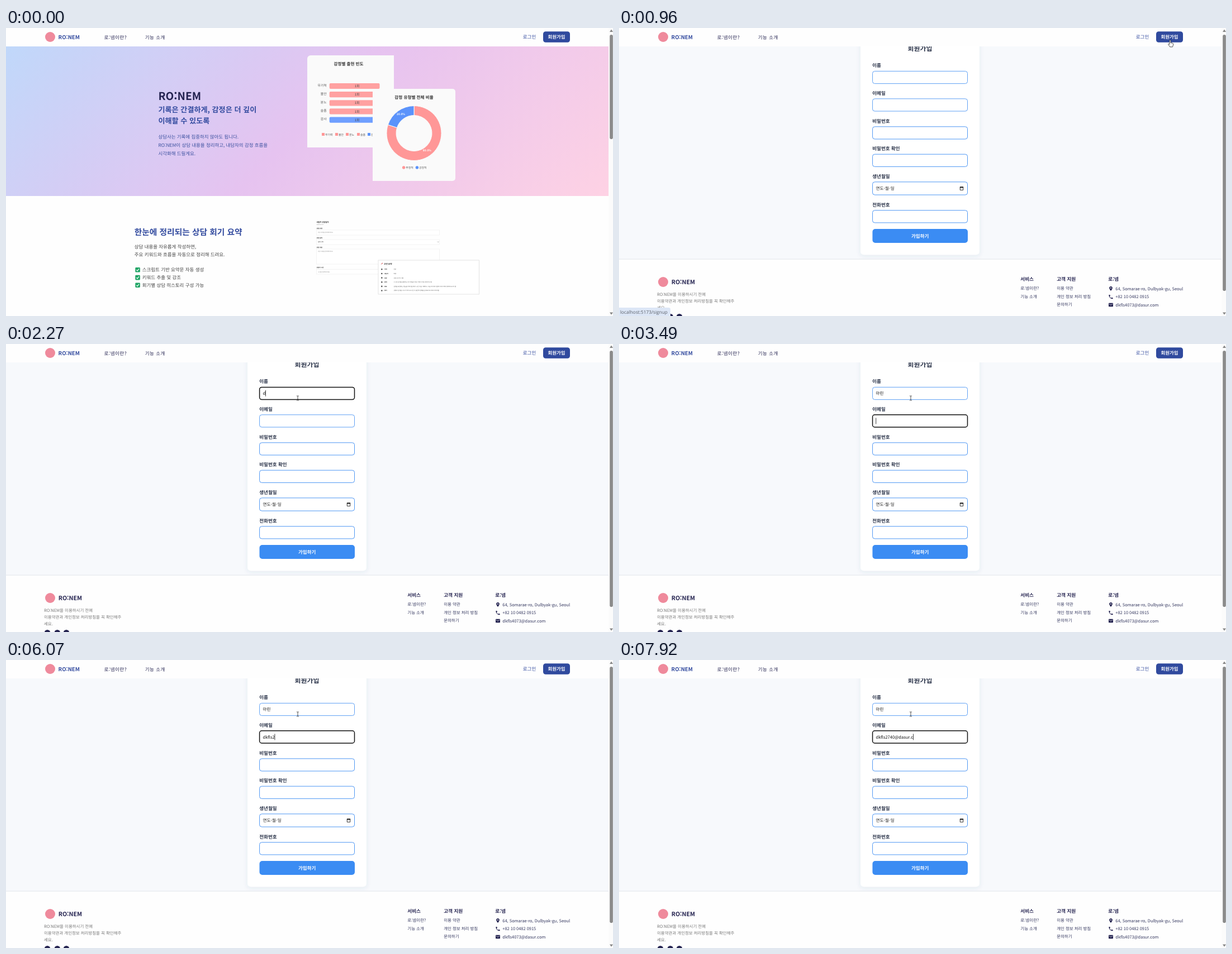
An HTML page that plays this animation: 1086 px wide and 516 px high, repeating every 8000 ms.

```html
<!DOCTYPE html>
<html lang="ko">
<head>
<meta charset="utf-8">
<title>RO:NEM</title>
<style>
  html, body { margin: 0; width: 100%; height: 100%; overflow: hidden; background: #fefefe; }
  svg { display: block; width: 1086px; height: 516px; }
  text {
    font-family: "Noto Sans CJK KR", "Noto Sans CJK JP", "Noto Sans CJK", "Noto Sans KR", sans-serif;
    font-variant-ligatures: no-contextual;
    text-rendering: geometricPrecision;
  }
  .status { font-family: "Open Sans", "Noto Sans", sans-serif; }
</style>
</head>
<body>
<svg id="stage" viewBox="0 0 1086 516" xmlns="http://www.w3.org/2000/svg"></svg>
<script>
const LOOP = 8000;
const NAVY = '#242350', BLUE = '#334b9f', PINK = '#ff9797', SKY = '#5b93fb', LOGO = '#ef8a9c';

// Text placed by its vertical centre.
const text = (x, cy, str, size, fill, weight = 400, more = '') =>
  `<text x="${x}" y="${cy + size * 0.37}" font-size="${size}" fill="${fill}" font-weight="${weight}" ${more}>${str}</text>`;
const mid = 'text-anchor="middle"', end = 'text-anchor="end"';
const rect = (x, y, w, h, fill, more = '') =>
  `<rect x="${x}" y="${y}" width="${w}" height="${h}" fill="${fill}" ${more}/>`;
const dot = (x, y, r, fill) => `<circle cx="${x}" cy="${y}" r="${r}" fill="${fill}"/>`;
const path = (d, fill, more = '') => `<path d="${d}" fill="${fill}" ${more}/>`;
const group = (id, body) => `<g id="${id}">${body}</g>`;

function barCard() {
  const names = ['무기력', '불안', '분노', '슬픔', '감사'];
  const legendX = [565, 589, 608, 628, 647];
  const color = i => i < 4 ? PINK : SKY;
  return path('M545 49H694V214H539V55a6 6 0 0 1 6-6z', '#fafafa') +
    text(613, 64.5, '감정별 출현 빈도', 7.55, '#333', 700, mid) +
    names.map((name, i) => {
      const y = 104 + i * 15.15;
      return text(573.5, y - 1.5, name, 5.8, '#555', 400, end) +
        rect(578.7, y - 5.1, 89.8, 10.2, i < 4 ? '#ffa1a1' : '#6f9fff', 'rx="2"') +
        text(628, y, '1회', 5.8, '#444', 500, mid) +
        rect(legendX[i], 188, 5, 5, color(i)) +
        text(legendX[i] + 6, 190.7, name, 4.9, '#555');
    }).join('');
}

function donutCard() {
  const cx = 730, cy = 188.5, R = 49, r = 32;
  const at = (deg, rad) => {
    const a = (deg - 90) * Math.PI / 180;
    return `${(cx + rad * Math.cos(a)).toFixed(2)} ${(cy + rad * Math.sin(a)).toFixed(2)}`;
  };
  const slice = (a, b, fill) => {
    const big = b - a > 180 ? 1 : 0;
    return path(`M${at(a, R)}A${R} ${R} 0 ${big} 1 ${at(b, R)}L${at(b, r)}A${r} ${r} 0 ${big} 0 ${at(a, r)}z`,
      fill, 'stroke="#fafafa" stroke-width="1"');
  };
  return path('M656 109H799a5 5 0 0 1 5 5V269a5 5 0 0 1-5 5H656z', '#fafafa') +
    text(730, 124.3, '감정 유형별 전체 비율', 7.6, '#333', 700, mid) +
    slice(0, 288, PINK) + slice(288, 360, SKY) +
    text(706.5, 154.2, '20.0%', 4.9, '#fff', 700, mid) +
    text(753.3, 219.4, '80.0%', 4.9, '#fff', 700, mid) +
    dot(711.6, 250, 2.7, PINK) + text(715.2, 250.4, '부정적', 4.9, '#555') +
    dot(735.4, 250, 2.7, SKY) + text(739, 250.4, '긍정적', 4.9, '#555');
}

function notes() {
  const line = 'stroke="#ececec" stroke-width=".6"';
  const field = (y, h, label, hint, w = 220, tone = '#888') =>
    text(555.5, y - 3, label, 2.6, '#333', 700) +
    rect(555.5, y, w, h, '#fff', line) +
    text(558, y + 4.5, hint, 2.5, tone);
  const rows = [
    ['주제', '진로'], ['내담자', '학생'], ['상황', '상담 초기의 기록'],
    ['문제', '스스로 감정을 표현하는 데 어려움이 있고 걱정이 많은 편이라고 함'],
    ['목표', '감정을 표현하는 연습을 하며 일상에서 느낀 것을 기록하고, 다음 회기에서 함께 이야기하며 정리해 보고자 함'],
    ['정리', '상황과 감정을 나누어 적어 보고 한 주 동안의 변화를 살펴보기로 하며 마무리함']
  ];
  return text(555.5, 347.3, '내담자 상담일지', 3.3, '#222', 700) +
    text(555.5, 352, '2025-07-07', 2.5, '#888') +
    field(362, 9, '상담 유형', '상담 유형을 입력해주세요') +
    field(379, 9, '상담 날짜', '날짜 선택', 220, '#222') +
    path('M772 382.6l1.2 1.3 1.2-1.3', 'none', 'stroke="#666" stroke-width=".5"') +
    field(396, 27, '상담 내용', '상담 내용을 입력해주세요') +
    field(432.5, 8.5, '상담자 소견', '소견을 입력해주세요', 111) +
    rect(666, 416, 180.5, 61, '#fff', 'stroke="#dcdcdc" stroke-width=".8"') +
    path('M670.5 424.2l2.6-3.6 1.2 1z', '#d95a5a') +
    text(676, 422.2, '고민 요약', 3.7, '#222', 700) +
    rows.map(([label, value], i) => {
      const y = 432.3 + i * 7.65;
      return dot(672.3, y, 1.3, '#555') + text(677, y, label, 2.5, '#333', 700) + text(693.5, y, value, 2.5, '#555');
    }).join('');
}

function home() {
  const check = (y, str) =>
    rect(231.3, y - 4.2, 8.6, 8.6, '#21a566', 'rx="1.4"') +
    path(`M233.3 ${y + .2}l1.7 1.8 3-3.8`, 'none', 'stroke="#fff" stroke-width="1.2"') +
    text(243.8, y, str, 8.45, '#444');
  return rect(0, 0, 1086, 516, '#fefefe') + rect(0, 33, 1078, 268, 'url(#hero)') +
    text(272.5, 121.5, 'RO:NEM', 19.2, NAVY, 700) +
    text(272.5, 146, '기록은 간결하게, 감정은 더 깊이', 13.12, BLUE, 600) +
    text(272.5, 166, '이해할 수 있도록', 13.12, BLUE, 600) +
    text(272.5, 194.6, '상담사는 기록에 집중하지 않아도 됩니다.', 8.43, '#3a509f') +
    text(272.5, 210, 'RO:NEM이 상담 내용을 정리하고, 내담자의 감정 흐름을', 8.43, '#3a509f') +
    text(272.5, 225.3, '시각화해 드릴게요.', 8.43, '#3a509f') +
    barCard() + donutCard() +
    text(229.7, 365.5, '한눈에 정리되는 상담 회기 요약', 14.75, BLUE, 700) +
    text(229.8, 392.2, '상담 내용을 자유롭게 작성하면,', 8.45, '#444') +
    text(229.8, 406, '주요 키워드와 흐름을 자동으로 정리해 드려요.', 8.45, '#444') +
    check(433.2, '스크립트 기반 요약문 자동 생성') +
    check(447, '키워드 추출 및 강조') +
    check(460.6, '회기별 상담 히스토리 구성 가능') +
    notes();
}

function footer() {
  const small = (x, y, str) => text(x, y, str, 7.45, '#33365e');
  const head = (x, str) => text(x, 450.2, str, 8.6, NAVY, 700);
  const icon = (y, d) => path(d, NAVY, `fill-rule="evenodd" transform="translate(875.2 ${y - 4.8}) scale(.4)"`);
  return rect(0, 414, 1078, 102, '#fefefe') + rect(0, 413.6, 1078, 1, '#e1e5eb') +
    dot(79, 455, 9, LOGO) + text(93.7, 455.2, 'RO:NEM', 10.6, NAVY, 700) +
    ['RO:NEM을 이용하시기 전에', '이용약관과 개인정보 처리방침을 꼭 확인해주', '세요.']
      .map((str, i) => text(68, 477 + i * 12, str, 7.45, '#777')).join('') +
    [74, 91.8, 108].map(x => dot(x, 517.3, 5.2, NAVY)).join('') +
    head(718.3, '서비스') + small(718.3, 466.6, '로:넴이란?') + small(718.3, 481, '기능 소개') +
    head(783.2, '고객 지원') + small(783.2, 466.6, '이용 약관') +
    small(783.2, 481, '개인 정보 처리 방침') + small(783.2, 495.7, '문의하기') +
    head(875.3, '로:넴') +
    icon(467, 'M12 2a7 7 0 0 0-7 7c0 5.2 7 13 7 13s7-7.8 7-13a7 7 0 0 0-7-7zm0 4.5a2.5 2.5 0 1 1 0 5 2.5 2.5 0 0 1 0-5z') +
    icon(481.7, 'M6.6 10.8c1.5 2.8 3.8 5.1 6.6 6.6l2.2-2.2c.3-.3.7-.4 1-.2 1.1.4 2.3.6 3.6.6.6 0 1 .4 1 1V20c0 .6-.4 1-1 1C10.6 21 3 13.4 3 4c0-.6.5-1 1-1h3.5c.6 0 1 .4 1 1 0 1.2.2 2.4.6 3.6.1.3 0 .7-.3 1z') +
    icon(496, 'M4 4h16a2 2 0 0 1 2 2v12a2 2 0 0 1-2 2H4a2 2 0 0 1-2-2V6a2 2 0 0 1 2-2zm0 3v1.6l8 5 8-5V7l-8 5z') +
    small(888.3, 466.8, '64, Somarae-ro, Dulbyak-gu, Seoul') +
    small(888.3, 481.6, '+82 10 0482 0915') +
    small(888.3, 495.8, 'dkfls4073@dasur.com');
}

function signup() {
  const labels = ['이름', '이메일', '비밀번호', '비밀번호 확인', '생년월일', '전화번호'];
  const tops = [77, 126.4, 176.4, 225.8, 275.4, 326.3];
  return rect(0, 0, 1086, 516, '#fefefe') + rect(0, 33, 1078, 381, '#f7f9fc') +
    rect(432, 10, 213, 396.3, '#fff', 'rx="6" filter="url(#soft)"') +
    text(538.5, 36.6, '회원가입', 11.9, '#2a3349', 700, mid) +
    labels.map((label, i) =>
      text(453.3, tops[i] - 9.8, label, 8.5, '#2a3349', 600) +
      `<rect id="field${i}" x="453.6" y="${tops[i] + .4}" width="169.9" height="${i === 4 ? 23.2 : 22.2}" rx="4" fill="#fff" stroke="#4f97f3"/>`
    ).join('') +
    text(459.6, 287.5, '연도-월-일', 7.55, '#222') +
    path('M610.3 285h5.4v5.4h-5.4z', 'none', 'stroke="#222" stroke-width=".9"') +
    rect(609.9, 284.4, 6.2, 2, '#222') +
    rect(453.5, 360, 170.5, 25, '#3b8cf3', 'rx="5"') +
    text(538.7, 372.4, '가입하기', 8.5, '#fff', 600, mid) +
    text(459.5, 88.4, '', 7.54, '#111', 400, 'id="name"') +
    text(459.5, 138.1, '', 7.54, '#111', 400, 'id="email"') +
    rect(0, 0, .8, 11, '#111', 'id="caret"') +
    footer();
}

const header = () => rect(0, 0, 1086, 33, '#fefefe') +
  dot(79, 16, 9, LOGO) + text(93.6, 16.3, 'RO:NEM', 9.6, BLUE, 700) +
  text(175.5, 16.5, '로:넴이란?', 8.5, NAVY, 500, 'letter-spacing=".5"') +
  text(248.7, 16.5, '기능 소개', 8.5, NAVY, 500, 'letter-spacing=".5"') +
  text(924.8, 16.3, '로그인', 8.5, BLUE, 500) +
  rect(961, 6.2, 48, 19.6, '#304a9e', 'rx="4.5" id="join"') +
  text(985, 16.3, '회원가입', 8.4, '#fff', 700, mid);

const scrollbar = () => rect(1078, 0, 8, 516, '#fbfbfb') +
  path('M1083 2.6l3 4.4h-6z', '#858585') + path('M1083 513.8l3-4.4h-6z', '#858585') +
  rect(1080.2, 12, 5.6, 187, '#8a8a8a', 'rx="2.8" id="thumb"');

const status = () => path('M0 501H89a3 3 0 0 1 3 3V516H0z', '#dce6f6') +
  text(2, 509, 'localhost:5173/signup', 8.3, '#5b6069', 400, 'class="status"');

const outline = 'stroke="#222" stroke-width=".8" stroke-linejoin="round"';
const cursors = {
  arrow: path('M0 0V10.2L2.4 8l1.6 3.6 1.6-.7L4 7.4h3.3z', '#fff', outline),
  hand: path('M-1 1a1 1 0 0 1 2 0V5l3.4.8a1.6 1.6 0 0 1 1.3 1.8L5 10.8 4.3 12.4H-.2L-3.2 8.2c-.6-1 .7-1.8 1.4-1L-1 8z', '#fff', outline),
  beam: path('M-2-4h1.4L0-3.4.6-4H2M0-3.4V3.4M-2 4h1.4L0 3.4.6 4H2', 'none', 'stroke="#222" stroke-width=".8"')
};

const stage = document.getElementById('stage');
stage.innerHTML = `<defs>
  <linearGradient id="hero" gradientUnits="userSpaceOnUse" x1="202.5" y1="-169.5" x2="875.5" y2="503.5">
    <stop offset="0" stop-color="#c0d8fa"/><stop offset=".5" stop-color="#e6c3f0"/><stop offset="1" stop-color="#fed2e4"/>
  </linearGradient>
  <filter id="soft" x="-10%" y="-10%" width="120%" height="120%">
    <feDropShadow dx="0" dy="2" stdDeviation="4" flood-color="#405080" flood-opacity=".09"/>
  </filter></defs>` +
  group('home', home()) + group('signup', signup()) + header() + scrollbar() + group('status', status()) +
  group('cursor', Object.entries(cursors).map(([id, body]) => group(id, body)).join(''));

const el = id => document.getElementById(id);
const show = (id, on) => el(id).setAttribute('visibility', on ? 'inherit' : 'hidden');

const track = [
  [60, 1074, 400], [130, 1076, 240], [180, 1066, 110], [220, 1044, 36], [260, 1022, 8],
  [490, 1022, 8], [600, 996, 19], [700, 986, 21.5], [1310, 986, 21.5],
  [1400, 860, 38], [1500, 670, 70], [1600, 552, 92], [1700, 522, 97]
];
const nameKeys = [
  [2220, 'd'], [2790, ''], [3140, 'ㅇ'], [3210, '아'], [3280, '알'], [3350, '아리'], [3420, '아린']
];
const spell = (times, str) => times.map((t, i) => [t, str.slice(0, i + 1)]);
const emailKeys = [
  [3850, 'ㅇ'], [3880, '아'], [4020, '아ㄹ'], [4130, '아러'], [4540, '아리'], [5080, '아'], [5110, ''],
  ...spell([5340, 5410, 5480, 5550, 5620, 6070, 6180, 6280, 6390, 6730, 6920, 6990, 7200, 7300, 7390, 7720, 7920],
    'dkfls2740@dasur.c')
];
const typed = (keys, t) => keys.reduce((now, [at, str]) => t >= at ? str : now, '');

function pointer(t) {
  const i = track.findIndex(p => p[0] > t);
  if (i < 0) return track[track.length - 1].slice(1);
  const [a, b] = [track[Math.max(i - 1, 0)], track[i]];
  const k = i ? (t - a[0]) / (b[0] - a[0]) : 0;
  return [a[1] + (b[1] - a[1]) * k, a[2] + (b[2] - a[2]) * k];
}

function render(t) {
  const onForm = t >= 960;
  show('home', !onForm);
  show('signup', onForm);
  show('status', t >= 700 && t < 1560);
  el('thumb').setAttribute('height', onForm ? 459 : 187);

  const [x, y] = pointer(t);
  const onJoin = x > 961 && x < 1009 && y > 6 && y < 26;
  const onField = onForm && x > 453 && x < 624 && y > 77 && y < 100;
  const kind = onJoin ? 'hand' : onField ? 'beam' : 'arrow';
  for (const id in cursors) show(id, t >= 60 && id === kind);
  el('cursor').setAttribute('transform', `translate(${x} ${y})`);
  el('join').setAttribute('fill', onJoin && !onForm ? '#3b56a9' : '#304a9e');

  const focus = t < 1740 ? -1 : t < 3490 ? 0 : 1;
  for (let i = 0; i < 2; i++) {
    el('field' + i).setAttribute('stroke', i === focus ? '#111' : '#4f97f3');
    el('field' + i).setAttribute('stroke-width', i === focus ? 1.5 : .9);
  }
  el('name').textContent = typed(nameKeys, t);
  el('email').textContent = typed(emailKeys, t);
  show('caret', onForm && focus >= 0);
  if (focus >= 0) {
    const box = el(focus ? 'email' : 'name');
    const width = box.textContent ? box.getComputedTextLength() : 0;
    el('caret').setAttribute('x', 459.4 + width);
    el('caret').setAttribute('y', focus ? 132.4 : 82.8);
  }
}

function tick() {
  render(performance.now() % LOOP);
  requestAnimationFrame(tick);
}
tick();
</script>
</body>
</html>
```
